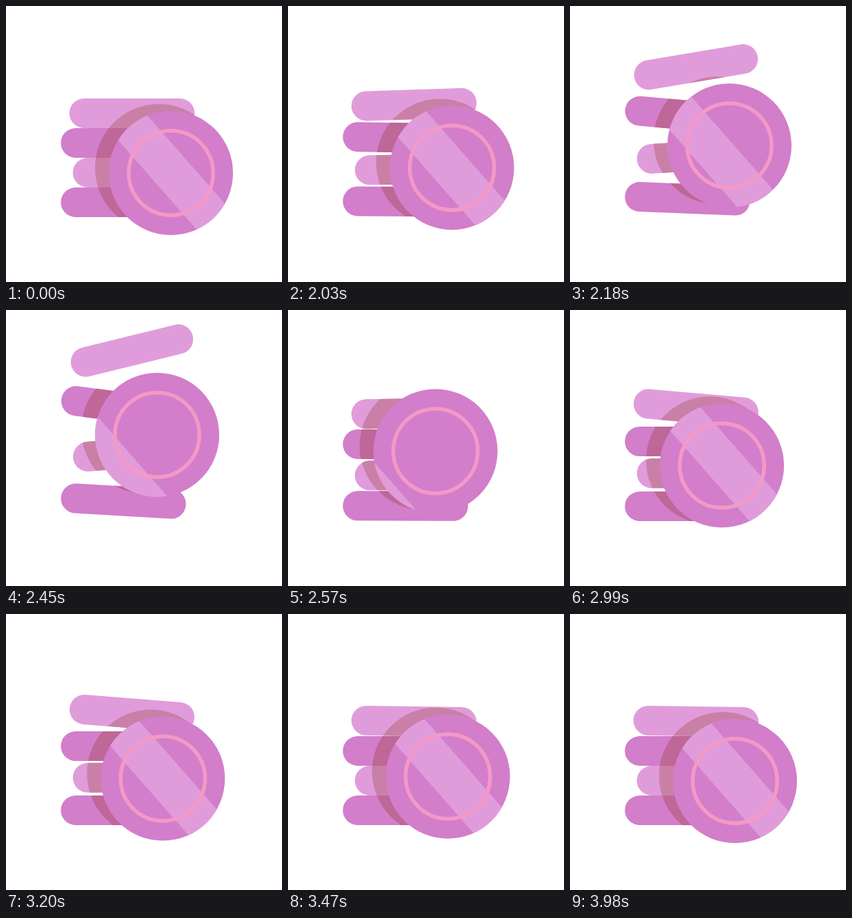
Write an HTML page with a canvas that moves like this. It is 400 px wide and 400 px high and loops after 4.07 s.

```html
<!DOCTYPE html>
<html>
<head>
<meta charset="utf-8">
<style>
  html, body { margin: 0; width: 100%; height: 100%; overflow: hidden; background: #fff; }
  canvas { display: block; }
</style>
</head>
<body>
<canvas id="stage" width="400" height="400"></canvas>
<script>
const ctx = document.getElementById('stage').getContext('2d');
const LOOP = 4070, FIRST = 2030, STEP = 30, LAST = 1980;
const LIGHT = '#e09cda', DARK = '#d27eca', RING = '#f498c6';
const LIGHT_SHADE = '#ca80a6', DARK_SHADE = '#be6798';
const BAR_W = 181.5, BAR_H = 43, R = 90;

// Middle of each bar at rest, leap height, and tilt at the top of the leap
const bars = [
  { x: 182.6, y: 155.5, rise: 108, tilt: -15.4, fill: LIGHT, shade: LIGHT_SHADE },
  { x: 170.2, y: 198.5, rise: 64.5, tilt: 8.3, fill: DARK, shade: DARK_SHADE },
  { x: 187.6, y: 241.5, rise: 39, tilt: -5.5, fill: LIGHT, shade: LIGHT_SHADE },
  { x: 170.2, y: 284.5, rise: 8.3, tilt: 3.7, fill: DARK, shade: DARK_SHADE }
];

const lerp = (a, b, p) => a + (b - a) * p;

// Fast rise that slows to the top, then a falling parabola
function leap(t, top, end) {
  if (t <= 0 || t >= end) return 0;
  return t < top ? 1 - (1 - t / top) ** 1.57 : 1 - ((t - top) / (end - top)) ** 2;
}

function bounce(t, start, end) {
  const p = (t - start) / (end - start);
  return p > 0 && p < 1 ? 4 * p * (1 - p) : 0;
}

// Straight segments between [time, value] points
function along(points, t) {
  const i = points.findIndex(p => p[0] >= t);
  if (i < 1) return points[i < 0 ? points.length - 1 : 0][1];
  const [t0, a] = points[i - 1], [t1, b] = points[i];
  return lerp(a, b, (t - t0) / (t1 - t0));
}

// The shine leaves at the lower left and returns from the upper right
function shineShift(t) {
  if (t < 620) return -(0.11 * t + 0.000136 * t * t);
  return 116 * Math.max(0, 1 - (t - 620) / 440) ** 2;
}

function disc(x, y, r, fill) {
  ctx.beginPath();
  ctx.arc(x, y, r, 0, 7);
  ctx.fillStyle = fill;
  ctx.fill();
}

function drawBar(bar, i, t, coin) {
  const first = leap(t, 390, 575);
  const later = i < 3 ? 0.25 * bounce(t, 575, 880) + 0.157 * bounce(t, 880, 1290) : 0;
  const up = bar.rise * (first + later);
  let tilt = bar.tilt * first;
  if (i === 0 && t > 575) tilt = 0.9 + 0.31 * up;

  ctx.save();
  ctx.translate(bar.x, bar.y - up);
  ctx.rotate(tilt * Math.PI / 180);
  ctx.beginPath();
  ctx.roundRect(-BAR_W / 2, -BAR_H / 2, BAR_W, BAR_H, BAR_H / 2);
  ctx.fillStyle = bar.fill;
  ctx.fill();
  ctx.clip();
  ctx.setTransform(1, 0, 0, 1, 0, 0);
  disc(coin.x - 17.5, coin.y - 7.5, 92.5, bar.shade);
  ctx.restore();
}

function drawCoin(coin, t) {
  ctx.save();
  ctx.translate(coin.x, coin.y);
  disc(0, 0, R, DARK);
  ctx.save();
  ctx.clip();
  ctx.rotate(48.7 * Math.PI / 180);
  ctx.fillStyle = LIGHT;
  ctx.fillRect(-100, -29.4 - shineShift(t), 200, 55.5);
  ctx.restore();
  ctx.beginPath();
  ctx.arc(0, 0, 61.2, 0, 7);
  ctx.lineWidth = 5.5;
  ctx.strokeStyle = RING;
  ctx.stroke();
  ctx.restore();
}

function draw(now) {
  const time = now % LOOP;
  const t = time < FIRST ? 0
    : Math.min(LAST, (Math.floor((time - FIRST) / STEP) + 1) * STEP);
  const up = 64 * leap(t, 390, 670) + 17 * bounce(t, 670, 1230) + 6.8 * bounce(t, 1230, 1620);
  const coin = {
    x: 239 + along([[0, 0], [670, -29.7], [1230, -10.7], [LAST, 0]], t),
    y: 242 - up
  };

  ctx.fillStyle = '#fff';
  ctx.fillRect(0, 0, 400, 400);
  bars.forEach((bar, i) => drawBar(bar, i, t, coin));
  drawCoin(coin, t);
}

const start = performance.now();
function tick() {
  draw(performance.now() - start);
  requestAnimationFrame(tick);
}
tick();
</script>
</body>
</html>
```
